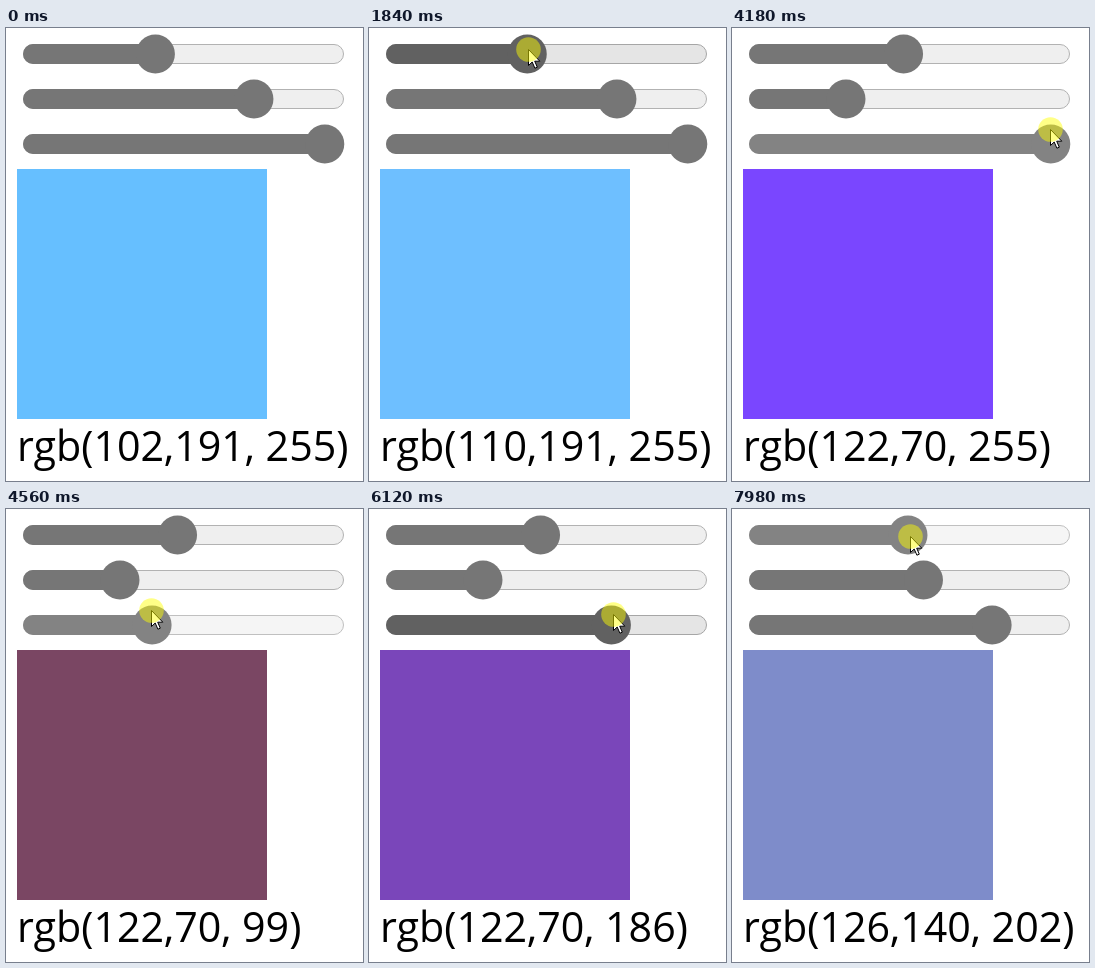
An HTML page with a canvas for the animation above (8 s loop, 357 by 453 pixels).

```html
<!DOCTYPE html>
<html lang="en">
<head>
<meta charset="utf-8">
<title>RGB sliders</title>
<style>
  html, body { margin: 0; width: 100%; height: 100%; overflow: hidden; background: #fff; }
  canvas { display: block; }
</style>
</head>
<body>
<canvas id="stage" width="357" height="453"></canvas>
<script>
const ctx = document.getElementById('stage').getContext('2d');
const LOOP = 8000, START = 188, STEP = 77.9;

const drags = [
  { slider: 0, start: 11, end: 15, to: 58, dx: 0, y: 21 },
  { slider: 0, start: 17, end: 24, to: 122, dx: 0, y: 21 },
  { slider: 1, start: 27, end: 41, to: 70, dx: 0, y: 63 },
  { slider: 2, start: 51, end: 61, to: 47, dx: -1, y: 101 },
  { slider: 2, start: 67.5, end: 80, to: 202, dx: 1, y: 105 },
  { slider: 1, start: 86.5, end: 93, to: 140, dx: 5, y: 69 },
  { slider: 0, start: 97.5, end: 100, to: 126, dx: 2, y: 27 }
];

const styles = {
  normal: { gray: '#767676', track: '#efefef', border: '#b2b2b2' },
  hover: { gray: '#616161', track: '#e5e5e5', border: '#a6a6a6' },
  pressed: { gray: '#838383', track: '#f5f5f5', border: '#c0c0c0' }
};

const mix = (a, b, p) => a + (b - a) * p;
const thumbX = value => 36.5 + value * 1.107;

function easeOut(step, start, end) {
  const p = Math.min(1, Math.max(0, (step - start) / (end - start)));
  return 1 - (1 - p) ** 2;
}

function stateAt(step) {
  const values = [102, 191, 255];
  let x = 215, y = 224, held = -1, last = { end: 0 };
  for (const d of drags) {
    const i = d.slider;
    if (step < d.start) {
      const p = easeOut(step, last.end, d.start - 1);
      x = mix(x, thumbX(values[i]) + d.dx, p);
      y = mix(y, d.y, p);
      held = last.slider === i ? i : -1;
      break;
    }
    values[i] = mix(values[i], d.to, easeOut(step, d.start, d.end));
    x = thumbX(values[i]) + d.dx;
    y = d.y;
    held = i;
    last = d;
  }
  return { values: values.map(Math.round), x: Math.round(x), y: Math.round(y), held };
}

function pill(x, y, w, h) {
  ctx.beginPath();
  ctx.roundRect(x, y, w, h, h / 2);
}

function disc(x, y, r, color) {
  ctx.fillStyle = color;
  ctx.beginPath();
  ctx.arc(x, y, r, 0, 2 * Math.PI);
  ctx.fill();
}

function slider(value, y, { gray, track, border }) {
  const x = thumbX(value);
  pill(17.5, y - 9.5, 320, 19);
  ctx.fillStyle = track;
  ctx.fill();
  ctx.strokeStyle = border;
  ctx.stroke();
  pill(17, y - 10, x - 17, 20);
  ctx.fillStyle = gray;
  ctx.fill();
  disc(x, y, 19.5, gray);
}

const arrow = new Path2D('M.5 .5V16.5L4.2 13L6.9 19.2L9.3 18.2L6.7 12.2H11.8Z');

function pointer(x, y) {
  ctx.save();
  ctx.translate(x, y);
  ctx.fillStyle = '#fff';
  ctx.fill(arrow);
  ctx.strokeStyle = '#000';
  ctx.stroke(arrow);
  disc(0.5, 0.5, 12.3, 'rgba(255,255,0,.47)');
  ctx.restore();
}

function draw(now) {
  const step = Math.floor((now % LOOP - START) / STEP), shown = step >= 0;
  const { values, x, y, held } = stateAt(step);
  const [r, g, b] = values;

  ctx.fillStyle = '#fff';
  ctx.fillRect(0, 0, 357, 453);
  values.forEach((value, i) => {
    const cy = 26 + 45 * i;
    const over = shown && Math.abs(y - cy) < 19.5;
    slider(value, cy, styles[held === i ? 'pressed' : over ? 'hover' : 'normal']);
  });
  ctx.fillStyle = `rgb(${r},${g},${b})`;
  ctx.fillRect(11, 141, 250, 250);
  ctx.fillStyle = '#000';
  ctx.font = '41.2px "Open Sans", "Noto Sans", sans-serif';
  ctx.fillText(`rgb(${r},${g}, ${b})`, 11, 433);
  if (shown) pointer(x, y);
}

const begin = performance.now();
function frame() {
  draw(performance.now() - begin);
  requestAnimationFrame(frame);
}
frame();
</script>
</body>
</html>
```
